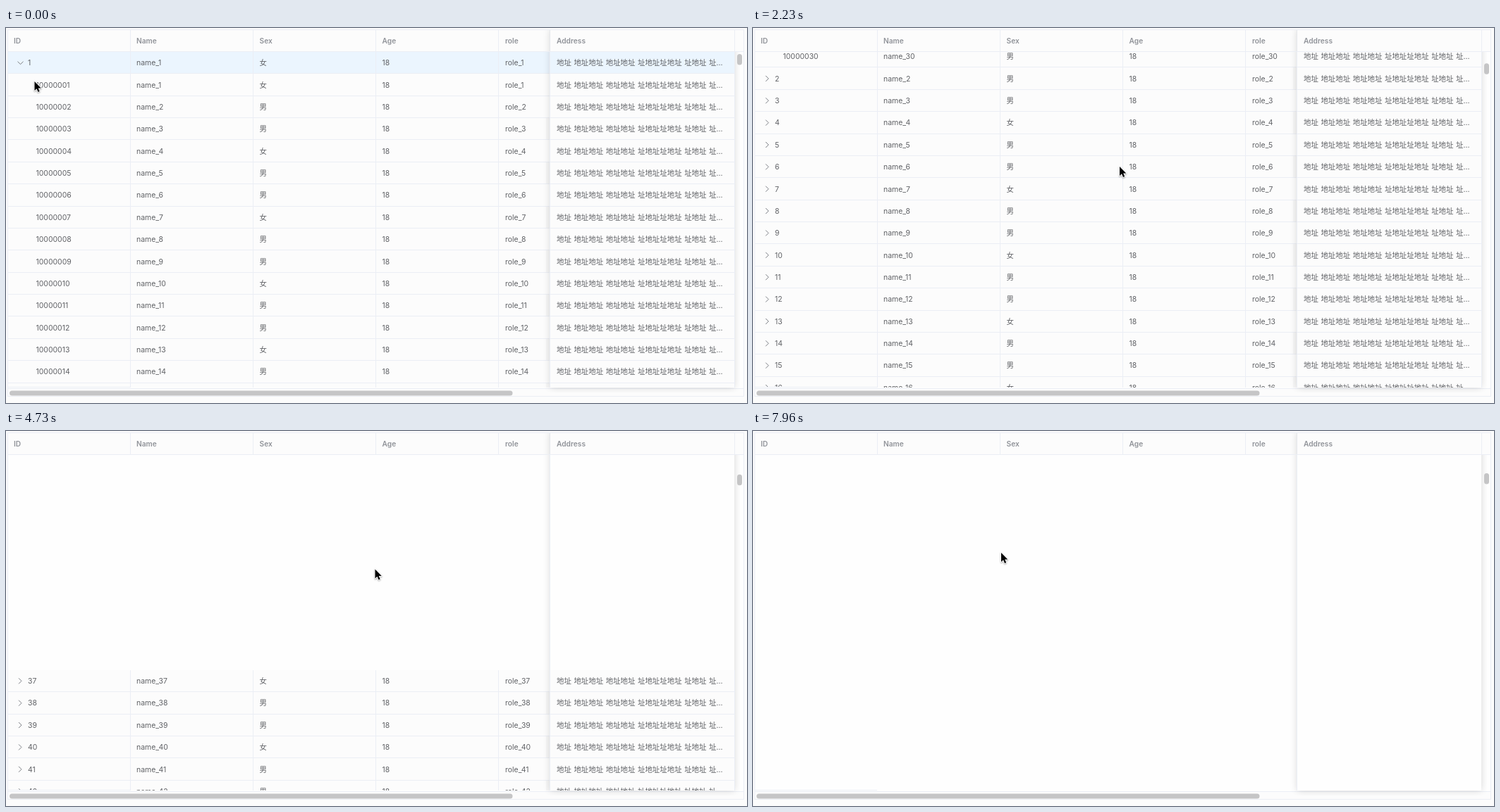
Recreate the animation shown at these times as an HTML page with a canvas. Size 1051x533 px, loop 8000 ms.

```html
<!DOCTYPE html>
<html lang="zh-CN">
<head>
<meta charset="utf-8">
<style>
html, body { margin: 0; width: 100%; height: 100%; overflow: hidden; background: #fcfcfc; }
canvas { display: block; }
</style>
</head>
<body>
<canvas id="stage" width="1051" height="533"></canvas>
<script>
const ctx = document.getElementById('stage').getContext('2d');
const LOOP = 8000, TICK = 147.3, TICKS = 55;
const TOP = 34, BOTTOM = 511, PITCH = 31.37, CHILDREN = 30, VISIBLE = 16;
const FIXED = 772, RIGHT = 1033;
const FAMILY = 'Inter, "Noto Sans CJK SC", "Noto Sans CJK", sans-serif';
const LINE = '#ebeef5', CELL = '#fcfcfc', BLANK = '#fefefe', HOVER = '#ebf5fe';
const COLUMNS = [['ID', 11], ['Name', 185], ['Sex', 359.5], ['Age', 533.5], ['role', 708], ['Address', 781]];
const DIVIDERS = [176, 350, 524, 698];
const ADDRESS = '地址 地址地址 地址地址 址地址址地址 址地址 址…';

// Scroll offsets, one per tick, from the tick in the key on
const SCROLL_RUNS = {
  9: [40, 150, 330, 516.5, 700, 860, 950],
  18: [1130, 1600, 2150, 2395, 2640, 2885, 3130, 3250],
  27: [3000, 2650, 2250, 2085],
  32: [1764.5, 1300, 850, 450, 180, 50, 0],
  50: [235, 600, 1000, 1350, 1640]
};
// Pointer path: tick, x, y
const POINTER = [
  [0, 40.5, 76], [5, 70, 74], [7, 70, 74], [10, 522.5, 198], [12, 522.5, 198],
  [15, 520, 197], [19, 520, 197], [20, 520, 197], [24, 519, 195.5], [26, 519, 195.5],
  [30, 523.5, 196.5], [41, 523.5, 196.5], [43, 250, 92], [44, 166.5, 64],
  [45, 19.5, 53], [46, 80, 62], [48, 700, 150], [49, 352, 173], [55, 352, 173]
];

// Rows are only rendered anew while scrolling is slow; a fast scroll shows blanks
const states = [];
let scroll = 0, base = 0, run = [];
for (let i = 0; i < TICKS; i++) {
  if (SCROLL_RUNS[i]) run = [...SCROLL_RUNS[i]];
  const next = run.length ? run.shift() : scroll;
  if (Math.abs(next - scroll) <= 230) base = next;
  scroll = next;
  states.push({ scroll, base });
}

function pointerAt(tick) {
  const i = POINTER.findIndex(p => p[0] > tick);
  const [a, x, y] = POINTER[i - 1], [b, x2, y2] = POINTER[i];
  const k = (tick - a) / (b - a);
  return [x + (x2 - x) * k, y + (y2 - y) * k];
}

function rect(x, y, w, h, color) {
  ctx.fillStyle = color;
  ctx.fillRect(x, y, w, h);
}

function pill(x, y, w, h, color) {
  ctx.fillStyle = color;
  ctx.beginPath();
  ctx.roundRect(x, y, w, h, Math.min(w, h) / 2);
  ctx.fill();
}

function text(str, x, mid, color = '#606266') {
  ctx.fillStyle = color;
  ctx.fillText(str, x, mid + 3.8);
}

function clipped(x, y, w, h, draw) {
  ctx.save();
  ctx.beginPath();
  ctx.rect(x, y, w, h);
  ctx.clip();
  draw();
  ctx.restore();
}

function chevron(mid, open) {
  ctx.strokeStyle = '#7d8086';
  ctx.lineWidth = 1;
  ctx.beginPath();
  if (open) {
    ctx.moveTo(16.5, mid - 1.7); ctx.lineTo(20.5, mid + 2.2); ctx.lineTo(24.5, mid - 1.7);
  } else {
    ctx.moveTo(18, mid - 4); ctx.lineTo(22, mid); ctx.lineTo(18, mid + 4);
  }
  ctx.stroke();
}

function rowsAt({ scroll, base }, hovered) {
  const rows = [], first = Math.floor(base / PITCH);
  for (let i = first; i <= first + VISIBLE; i++) {
    const y = TOP + i * PITCH - scroll;
    if (y > BOTTOM || y + PITCH < TOP) continue;
    const child = i > 0 && i <= CHILDREN;
    const top = Math.round(y), end = Math.round(y + PITCH);
    rows.push({
      i, child, top, h: end - top, mid: y + 15.4,
      n: i === 0 ? 1 : child ? i : i - CHILDREN + 1,
      color: i === hovered ? HOVER : CELL
    });
  }
  return rows;
}

function mainCells({ i, child, top, h, mid, n, color }) {
  rect(3, top, FIXED - 3, h, color);
  rect(3, top + h - 1, FIXED - 3, 1, LINE);
  for (const x of DIVIDERS) rect(x, top, 1, h, LINE);
  if (!child) chevron(mid, i === 0);
  text(child ? 10000000 + n : n, child ? 42.5 : 31, mid);
  text('name_' + n, 185, mid);
  text(n % 3 === 1 ? '女' : '男', 359.5, mid);
  text('18', 533.5, mid);
  text('role_' + n, 708, mid);
}

function fixedCell({ i, top, h, mid, color }) {
  if (i % 2 && i > 1) rect(766, top, 5, h - 1, 'rgba(0,0,0,0.025)');
  rect(FIXED, top, RIGHT - FIXED, h, color);
  rect(FIXED, top + h - 1, RIGHT - FIXED, 1, LINE);
  rect(RIGHT, top, 1, h, LINE);
  ctx.wordSpacing = '0.6px';
  text(ADDRESS, 781, mid);
  ctx.wordSpacing = '0px';
}

function fixedShadow() {
  ctx.shadowColor = 'rgba(0,0,0,0.16)';
  ctx.shadowBlur = 10;
  rect(FIXED, 2, RIGHT - FIXED, BOTTOM - 2, BLANK);
}

function header() {
  rect(3, 3, 1043, 30, CELL);
  clipped(760, 3, 12, 30, fixedShadow);
  rect(FIXED, 3, 274, 30, CELL);
  rect(2, 33, 1045, 1, LINE);
  for (const x of [...DIVIDERS, RIGHT]) rect(x, 3, 1, 30, LINE);
  ctx.font = '600 10.2px ' + FAMILY;
  for (const [label, x] of COLUMNS) text(label, x, 18, '#909399');
}

function pointer(x, y) {
  ctx.save();
  ctx.translate(x, y);
  ctx.beginPath();
  for (const [px, py] of [[0, 0], [0, 13], [3, 10.3], [5, 15], [7.2, 14], [5.2, 9.5], [9.3, 9.5]]) ctx.lineTo(px, py);
  ctx.closePath();
  ctx.lineJoin = 'round';
  ctx.lineWidth = 1.8;
  ctx.strokeStyle = '#fff';
  ctx.shadowColor = 'rgba(0,0,0,0.35)';
  ctx.shadowBlur = 2;
  ctx.shadowOffsetY = 1;
  ctx.stroke();
  ctx.shadowColor = 'transparent';
  ctx.fillStyle = '#000';
  ctx.fill();
  ctx.restore();
}

function draw(now) {
  const tick = Math.min(TICKS - 1, Math.floor((now % LOOP) / TICK));
  const state = states[tick];
  const rows = rowsAt(state, tick ? 1 : 0);

  rect(0, 0, 1051, 533, CELL);
  rect(3, TOP, 1043, 478, BLANK);
  ctx.font = '10.45px ' + FAMILY;
  clipped(3, TOP, 1043, BOTTOM - TOP, () => rows.forEach(mainCells));
  rect(3, 510, 173, 1, LINE);
  rect(3, 512, 1043, 1, LINE);
  clipped(760, TOP, 281, 484, fixedShadow);
  clipped(3, TOP, 1043, BOTTOM - TOP, () => rows.forEach(fixedCell));
  rect(771, 3, 1, 508, LINE);
  header();
  rect(771, 3, 1, 30, '#e6e8ec');

  rect(2, 2, 1045, 1, LINE);
  rect(2, 523, 1045, 1, LINE);
  rect(2, 2, 1, 522, LINE);
  rect(1046, 2, 1, 522, LINE);
  pill(5, 515.5, 713.5, 7, '#c5c5c6');
  pill(1037, 37 + state.scroll / 71.5, 7, 15.5, '#c5c5c6');
  pointer(...pointerAt(tick));
  requestAnimationFrame(draw);
}
requestAnimationFrame(draw);
</script>
</body>
</html>
```
